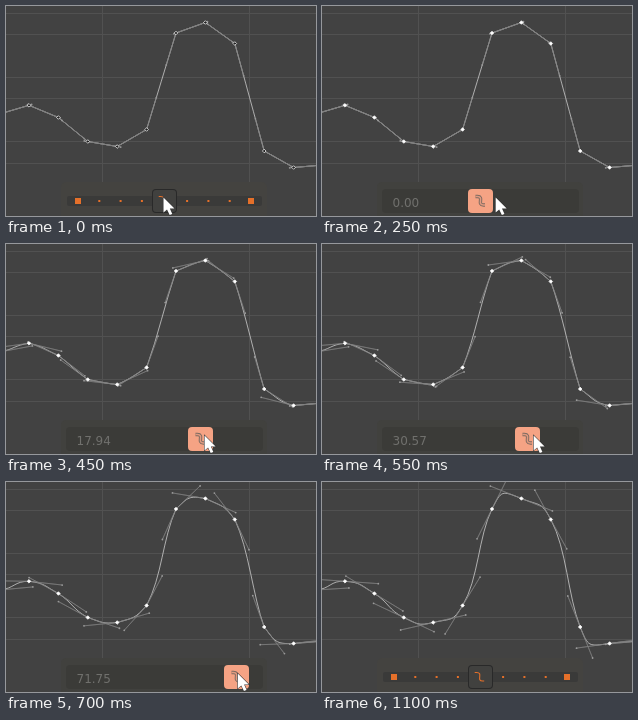
An HTML page with a canvas for the animation above (1200 ms loop, 310 by 210 pixels).

```html
<!DOCTYPE html>
<html lang="en">
<head>
<meta charset="utf-8">
<title>Curve smoothing slider</title>
<style>
  html, body { margin: 0; height: 100%; overflow: hidden; background: #424242; }
  canvas { display: block; width: 310px; height: 210px; }
</style>
</head>
<body>
<canvas id="stage"></canvas>
<script>
const W = 310, H = 210, LOOP = 1200, STEP = 50;
const PRESS = 100, DROP = 800, RELEASE = 1100;
const HANDLE = 33.4, TRAVEL = 85, MIDDLE = 158.5;
const ORANGE = '#e5702a';
const canvas = document.getElementById('stage');
const c = canvas.getContext('2d');
const ratio = window.devicePixelRatio || 1;
canvas.width = W * ratio;
canvas.height = H * ratio;
c.scale(ratio, ratio);

// Evenly spaced keys: height and slope once smoothed
const keys = [
  [108, -.06], [99.3, .07], [111.5, .61], [135.5, .47], [140.5, -.23], [123.5, -1.63],
  [27, -2], [16.5, .4], [37.5, 1.84], [145, 2.5], [161.5, -.14], [159, -.1]
].map(([y, slope], i) => ({ x: 29.4 * i - 6.4, y, slope }));

// Drag distance at a few times
const drag = [[250, 0], [350, 25], [550, 47], [700, 72], [DROP, TRAVEL]];

function dragAt(t) {
  const i = drag.findIndex(([time]) => t <= time);
  if (i < 1) return i ? TRAVEL : 0;
  const [t0, a] = drag[i - 1], [t1, b] = drag[i];
  return a + (b - a) * (t - t0) / (t1 - t0);
}

function stroke(color, width) {
  c.strokeStyle = color;
  c.lineWidth = width;
  c.stroke();
}

function fill(color) {
  c.fillStyle = color;
  c.fill();
}

function polygon(points) {
  c.beginPath();
  for (const [x, y] of points) c.lineTo(x, y);
  c.closePath();
}

function box(x, y, w, h, r, color) {
  c.beginPath();
  c.roundRect(x, y, w, h, r);
  fill(color);
}

// Handle offset, turned from the neighbour's direction to the smooth slope;
// turns towards steep start late, turns towards flat start early
function handle(i, side, amount) {
  const k = keys[i], n = keys[i + side] || keys[i - side];
  const from = Math.atan((n.y - k.y) / (n.x - k.x)), to = Math.atan(k.slope);
  const angle = from + (to - from) * amount ** Math.sqrt(Math.abs(to / from));
  return [side * HANDLE * Math.cos(angle), side * HANDLE * Math.sin(angle)];
}

function drawGrid() {
  c.fillStyle = '#424242';
  c.fillRect(0, 0, W, H);
  c.fillStyle = '#515151';
  for (let i = 0; i < 2; i++) c.fillRect(96 + 147 * i, 0, 1, H);
  for (let i = 0; i < 3; i++) {
    c.fillRect(0, 7 + 64 * i, W, 1);
    c.fillRect(0, 28 + 64 * i + i / 2 | 0, W, 1);
  }
}

function drawCurve(amount, selected) {
  c.beginPath();
  c.moveTo(keys[0].x, keys[0].y);
  for (let i = 1; i < keys.length; i++) {
    const a = keys[i - 1], b = keys[i];
    const out = handle(i - 1, 1, amount), into = handle(i, -1, amount);
    // Shorten overlapping handles so the curve never runs backwards
    const f = Math.min(1, (b.x - a.x) / (out[0] - into[0]));
    c.bezierCurveTo(a.x + out[0] * f, a.y + out[1] * f, b.x + into[0] * f, b.y + into[1] * f, b.x, b.y);
  }
  stroke('#dedede', .7);

  keys.forEach(({ x, y }, i) => {
    for (const side of [-1, 1]) {
      const [dx, dy] = handle(i, side, amount);
      polygon([[x, y], [x + dx, y + dy]]);
      stroke('#808080', .6);
      c.beginPath();
      c.arc(x + dx, y + dy, .9, 0, 7);
      fill('#999');
    }
  });

  for (const { x, y } of keys) {
    polygon([[x, y - 1.8], [x + 1.8, y], [x, y + 1.8], [x - 1.8, y]]);
    fill(selected ? '#fff' : '#222');
    stroke('#fff', .7);
  }
}

function drawIcon(x, color, width) {
  c.beginPath();
  c.moveTo(x - 5, 190.5);
  c.lineTo(x - 3, 190.5);
  c.bezierCurveTo(x + 4, 190.5, x - 4, 199, x + 3, 199);
  c.lineTo(x + 4.5, 199);
  stroke(color, width);
}

function drawSlider(offset, active) {
  const x = MIDDLE + offset;
  box(55, 176, 206, 40, 5, active ? '#41413e' : '#444340');
  if (active) {
    box(60, 183, 197, 24, 4, '#3b3b38');
    c.fillStyle = '#70706d';
    c.font = '12px "DejaVu Sans", sans-serif';
    c.fillText((100 * (offset / TRAVEL) ** 2).toFixed(2), 70.5, 200.5);
    box(x - 12.5, 183, 25, 24, 4, '#f5a384');
    drawIcon(x, '#7d6a60', 3.4);
    drawIcon(x, '#e09a80', 1.5);
    return;
  }
  box(61, 190, 195, 10, 2, '#3a3a39');
  c.fillStyle = ORANGE;
  for (let i = 1; i <= 4; i++) {
    const size = i < 4 ? 2 : 6;
    for (const side of [-1, 1])
      c.fillRect(MIDDLE + side * (21.3 * i + 1.3) - size / 2, 195 - size / 2, size, size);
  }
  box(x - 12.5, 183, 25, 24, 4, '#292929');
  box(x - 11.5, 184, 23, 22, 3, '#41413f');
  drawIcon(x - .8, ORANGE, 1.1);
}

function drawCursor(t) {
  const u = Math.max(0, (t - PRESS) / (DROP - PRESS));
  c.save();
  c.translate(157.5 + 88 * u ** 1.1, 191.5);
  c.scale(.88, .88);
  polygon([[0, 0], [0, 17], [4, 13.5], [7, 20], [10, 18.7], [7.2, 12.5], [12.5, 12.5]]);
  stroke('#333', 1.2);
  fill('#fff');
  c.restore();
}

function draw(now) {
  const t = Math.floor(now % LOOP / STEP) * STEP;
  const active = t >= PRESS && t < RELEASE;
  const offset = dragAt(t);
  drawGrid();
  drawCurve((offset / TRAVEL) ** 2, t >= PRESS);
  drawSlider(t < RELEASE ? offset : 0, active);
  if (t < DROP) drawCursor(t);
}

let start;
function frame(now) {
  start ??= now;
  draw(now - start);
  requestAnimationFrame(frame);
}
draw(0);
requestAnimationFrame(frame);
</script>
</body>
</html>
```
